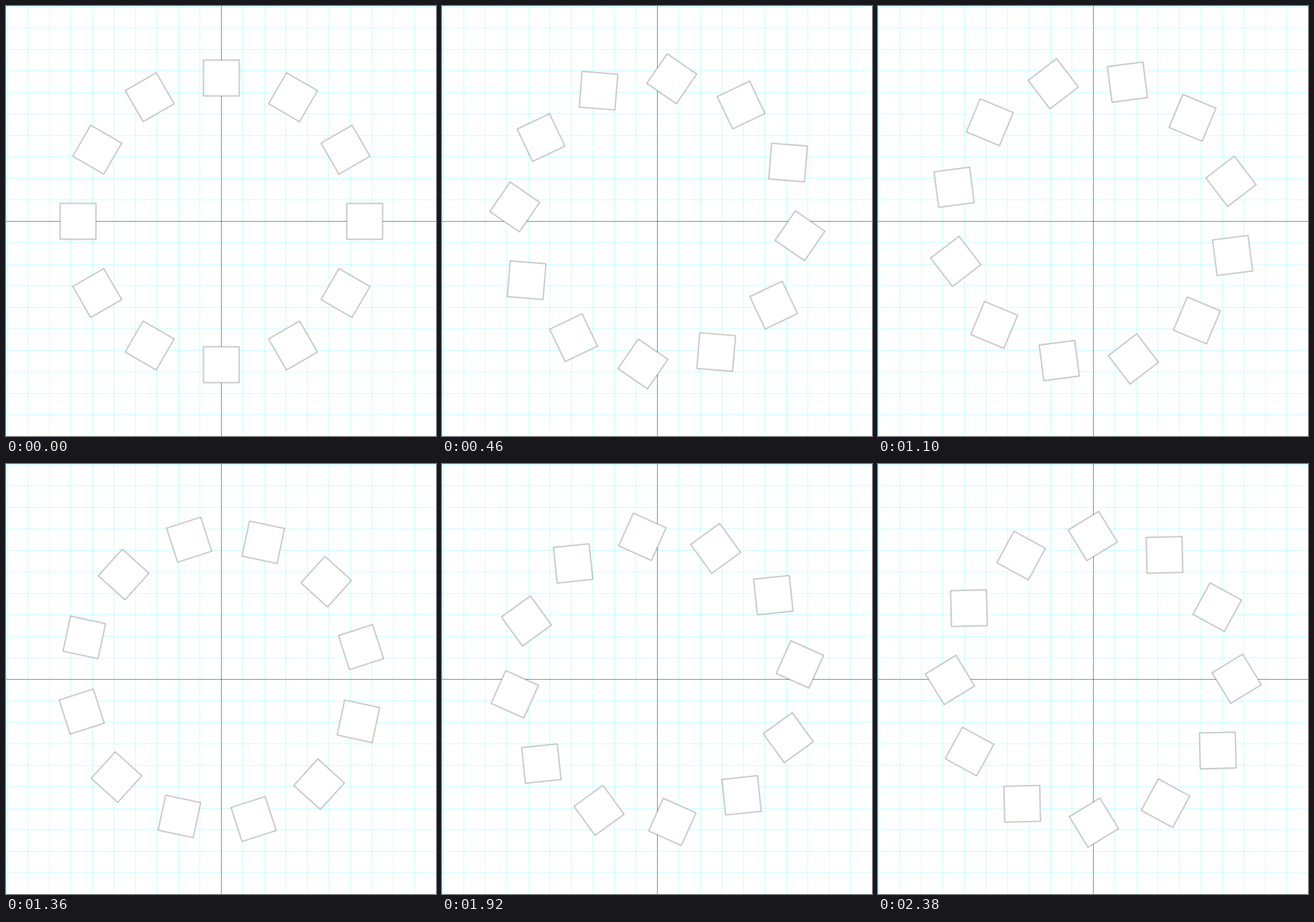
Animation, 600 px wide and 600 px high, one loop 2400 ms. Source, as an HTML page:

```html
<!DOCTYPE html>
<html lang="en">
<head>
<meta charset="utf-8">
<title>Turning squares</title>
<style>
  html, body { margin: 0; width: 100%; height: 100%; overflow: hidden; background: #fff; }
  svg {
    --line: rgba(0, 255, 255, .2);
    display: block;
    width: 600px;
    height: 600px;
    background:
      linear-gradient(var(--line) 1px, transparent 1px) 0 0 / 30px 30px,
      linear-gradient(90deg, var(--line) 1px, transparent 1px) 0 0 / 30px 30px;
  }
  path, rect { stroke: rgba(0, 0, 0, .4); stroke-width: 1; }
  rect { fill: #fff; }
  .ring { animation: ring 2.4s linear infinite; }
  rect { animation: spin 2.4s linear infinite; }
  @keyframes ring { from { transform: rotate(0deg); } to { transform: rotate(30deg); } }
  @keyframes spin { from { transform: rotate(0deg); } to { transform: rotate(150deg); } }
</style>
</head>
<body>
<svg viewBox="0 0 600 600">
  <g transform="translate(300.5 300.5)">
    <path d="M-301 0H300M0 -301V300"/>
    <g class="ring"></g>
  </g>
</svg>
<script>
  const COUNT = 12, RADIUS = 200, SIZE = 50;
  const ring = document.querySelector('.ring');
  const square = `<rect x="${-SIZE / 2}" y="${-SIZE / 2}" width="${SIZE}" height="${SIZE}"/>`;
  ring.innerHTML = Array.from({ length: COUNT }, (_, i) =>
    `<g transform="rotate(${i * 360 / COUNT}) translate(${RADIUS} 0)">${square}</g>`).join('');
</script>
</body>
</html>
```
